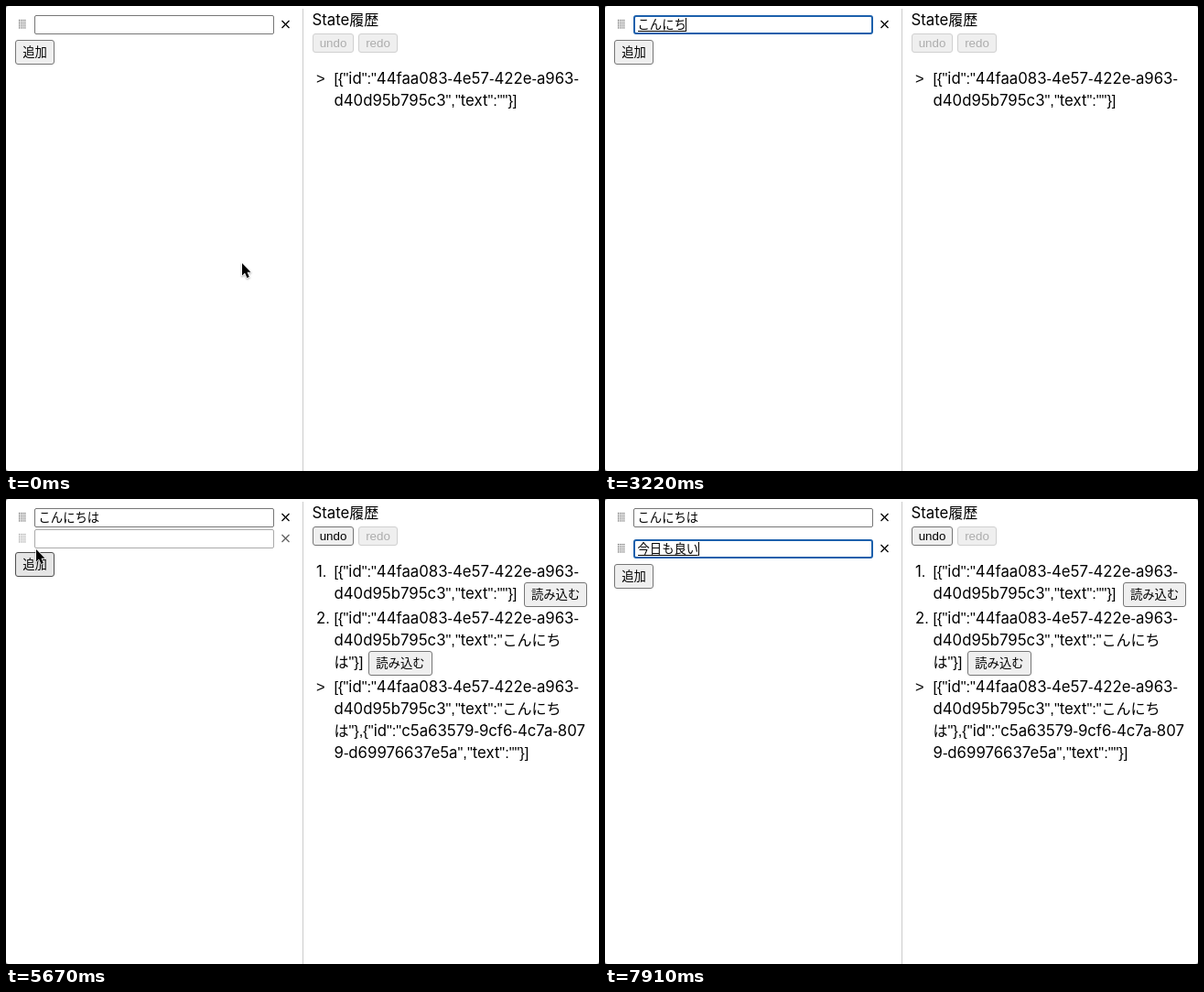
Animation, 648 px wide and 508 px high, one loop 8 s. Source, as an HTML page with a canvas:

```html
<!DOCTYPE html>
<html lang="ja">
<head>
<meta charset="utf-8">
<style>
html, body { margin: 0; width: 100%; height: 100%; overflow: hidden; background: #fff; }
canvas { display: block; width: 648px; height: 508px; }
</style>
</head>
<body>
<canvas id="stage"></canvas>
<script>
const W = 648, H = 508, LOOP = 8000, STEP = 70;
const CJK = '"Noto Sans CJK JP", "Noto Sans CJK", sans-serif';
const KANA = '16px ' + CJK;
const WORD = '16.75px Inter, sans-serif';
const PUNCT = '16.4px "Liberation Sans", Arial, sans-serif';
const FIELD = '13.333px ' + CJK;
const CONTROL = '13.333px "Liberation Sans", Arial, sans-serif';

const canvas = document.getElementById('stage');
const ctx = canvas.getContext('2d');
const dpr = window.devicePixelRatio || 1;
canvas.width = W * dpr;
canvas.height = H * dpr;

// Text entry as [time, text]
const firstText = [
  [0, ''], [2380, 'ｋ'], [2520, 'こ'], [2660, 'こｎ'], [2800, 'こん'], [2940, 'こんに'],
  [3080, 'こんにｃ'], [3220, 'こんにち'], [3290, 'こんにちｈ'], [3430, 'こんにちは']
];
const secondText = [
  [0, ''], [6930, 'ｋ'], [7070, 'ｋｙ'], [7140, 'きょ'], [7280, 'きょう'], [7420, '今日'],
  [7560, '今日ｍ'], [7630, '今日も'], [7770, '今日もい'], [7910, '今日も良い']
];
const caretOn = [[1680, 2240], [2380, 4340], [4830, 5320], [5880, 6370], [6860, LOOP]];

// Pointer path as [time, x, y]; it hides while typing
const pointerPath = [
  [0, 258, 281], [420, 608, 170], [560, 600, 120], [980, 20, 25], [1120, 72, 29],
  [1400, 93, 24], [1680, 93, 23], [1750, 93, 21], [4410, 93, 21], [4620, 102, 48],
  [5180, 33, 55], [5670, 33, 55], [5950, 80, 54], [6440, 82, 52]
];
const pointerOn = [[0, 2380], [4410, 6440]];

const ID_HEAD = '[{"id":"44faa083-4e57-422e-a963-';
const ID_TAIL = 'd40d95b795c3","text":"';
const history = [
  { from: 0, y: 85, load: [565.9, 91], lines: [ID_HEAD, ID_TAIL + '"}]'] },
  { from: 3780, y: 136, load: [396.3, 166], lines: [ID_HEAD, ID_TAIL + 'こんにち', 'は"}]'] },
  { from: 5530, y: 211, lines: [ID_HEAD, ID_TAIL + 'こんにち',
    'は"},{"id":"c5a63579-9cf6-4c7a-807', '9-d69976637e5a","text":""}]'] }
];

const within = (spans, t) => spans.some(([a, b]) => t >= a && t < b);
const latest = (list, t) => list.filter(e => e[0] <= t).pop()[1];
const easeOut = k => 1 - (1 - k) ** 2;
const clamp = k => Math.max(0, Math.min(1, k));

function pointerAt(t) {
  const i = pointerPath.findIndex(p => p[0] > t);
  if (i < 0) return pointerPath[pointerPath.length - 1].slice(1);
  const [t0, x0, y0] = pointerPath[i - 1], [t1, x1, y1] = pointerPath[i];
  const k = (t - t0) / (t1 - t0);
  return [x0 + (x1 - x0) * k, y0 + (y1 - y0) * k];
}

function label(text, x, y, font, color = '#000', align = 'left') {
  ctx.font = font;
  ctx.fillStyle = color;
  ctx.textAlign = align;
  ctx.fillText(text, x, y);
}

// Body text: words, kana and punctuation each have their own face
function prose(text, x, y) {
  for (const run of text.match(/\w+|[^\x00-\x7f]+|\W/g)) {
    label(run, x, y, /\w/.test(run) ? WORD : run > '\x7f' ? KANA : PUNCT);
    x += ctx.measureText(run).width;
  }
}

// Edges snap to whole pixels
function box(x, y, w, h, fill, border, line = 1, radius = 2.5) {
  const left = Math.round(x), top = Math.round(y);
  const right = Math.round(x + w), bottom = Math.round(y + h);
  ctx.beginPath();
  ctx.roundRect(left + line / 2, top + line / 2, right - left - line, bottom - top - line, radius);
  ctx.fillStyle = fill;
  ctx.fill();
  ctx.lineWidth = line;
  ctx.strokeStyle = border;
  ctx.stroke();
}

function button(text, x, y, w, h, font, { fill = '#efefef', border = '#767676', ink = '#000' } = {}) {
  box(x, y, w, h, fill, border);
  label(text, x + w / 2, y + h / 2 + (h > 21 ? 4.5 : 4.5), font, ink, 'center');
}

function item(y, text, { focus, caret, composing, alpha = 1 }) {
  ctx.globalAlpha = alpha;
  ctx.fillStyle = '#444';
  for (let i = 0; i < 20; i++) {
    ctx.fillRect(14 + (i % 4) * 2.1, y + 5 + Math.floor(i / 4) * 2.1, 1.1, 1.1);
  }
  if (focus) box(31, y, 262, 21, '#fff', '#1c60ac', 2, 2);
  else box(31, y, 262, 21, '#fff', '#767676', 1, 1.5);
  label(text, 35.5, y + 15, FIELD);
  const end = 35.5 + ctx.measureText(text).width;
  if (composing && text) ctx.fillRect(36, y + 17, end - 36.5, 1);
  if (caret) ctx.fillRect(Math.round(end - 0.5), y + 3, 1, 15);

  ctx.beginPath();
  ctx.moveTo(301.5, y + 6); ctx.lineTo(309.5, y + 14);
  ctx.moveTo(309.5, y + 6); ctx.lineTo(301.5, y + 14);
  ctx.lineWidth = 1.3;
  ctx.strokeStyle = '#000';
  ctx.stroke();
  ctx.globalAlpha = 1;
}

function arrow(x, y) {
  const shape = [[0, 0], [0, 13.4], [3, 10.6], [5.4, 16], [7.8, 15], [5.5, 9.7], [9.5, 9.7]];
  ctx.beginPath();
  shape.forEach(([dx, dy]) => ctx.lineTo(x + dx, y + dy));
  ctx.closePath();
  ctx.save();
  ctx.shadowColor = 'rgba(0,0,0,.35)';
  ctx.shadowBlur = 2;
  ctx.shadowOffsetY = 1;
  ctx.lineWidth = 1.6;
  ctx.lineJoin = 'round';
  ctx.strokeStyle = '#fff';
  ctx.stroke();
  ctx.restore();
  ctx.fillStyle = '#000';
  ctx.fill();
}

function beam(x, y) {
  ctx.beginPath();
  ctx.moveTo(x - 3, y - 7); ctx.quadraticCurveTo(x + 0.5, y - 7, x + 0.5, y - 5);
  ctx.lineTo(x + 0.5, y + 5); ctx.quadraticCurveTo(x + 0.5, y + 7, x - 3, y + 7);
  ctx.moveTo(x + 4, y - 7); ctx.quadraticCurveTo(x + 0.5, y - 7, x + 0.5, y - 5);
  ctx.moveTo(x + 0.5, y + 5); ctx.quadraticCurveTo(x + 0.5, y + 7, x + 4, y + 7);
  ctx.moveTo(x - 1.5, y + 3.5); ctx.lineTo(x + 2.5, y + 3.5);
  ctx.lineWidth = 1.1;
  ctx.strokeStyle = '#000';
  ctx.stroke();
}

function drawHistory(t) {
  const off = { border: '#d0d0d0', ink: '#adadad' };
  prose('State履歴', 334.5, 21);
  button('undo', 335, 30, 45, 21, CONTROL, t < 3780 ? off : {});
  button('redo', 385, 30, 43, 21, CONTROL, off);
  const shown = history.filter(h => h.from <= t);
  shown.forEach((h, i) => {
    const current = i === shown.length - 1;
    prose(current ? '>' : i + 1 + '.', 339, h.y);
    h.lines.forEach((line, n) => prose(line, 358.5, h.y + n * 24));
    if (!current) button('読み込む', ...h.load, 69.3, 27, FIELD);
  });
}

function addStyle(t) {
  if (within([[5460, 5530]], t)) return { fill: '#f5f5f5', border: '#8d8d8d' };
  if (within([[5110, 5740]], t)) return { fill: '#e5e5e5', border: '#4f4f4f' };
  return {};
}

function drawList(t) {
  const caret = within(caretOn, t);
  const grow = easeOut(clamp((t - 5530) / 365));
  const secondY = Math.round(15 + 29 * grow);
  const focusFirst = t >= 1680 && t < 5460;
  const focusSecond = t >= 5880;
  if (grow > 0) {
    item(secondY, latest(secondText, t), {
      focus: focusSecond, caret: focusSecond && caret, composing: true, alpha: grow
    });
  }
  item(10, latest(firstText, t), {
    focus: focusFirst, caret: focusFirst && caret, composing: t < 3710
  });
  button('追加', 10, Math.round(37 + 34 * grow), 43, 27, FIELD, addStyle(t));

  if (!within(pointerOn, t)) return;
  const [x, y] = pointerAt(t);
  const over = top => x >= 31 && x <= 293 && y >= top && y <= top + 21;
  (over(10) || (grow > 0.7 && over(secondY)) ? beam : arrow)(x, y);
}

function draw(t) {
  ctx.setTransform(dpr, 0, 0, dpr, 0, 0);
  ctx.fillStyle = '#8a8a8a';
  ctx.fillRect(0, 0, W, H);
  ctx.fillStyle = '#fff';
  ctx.beginPath();
  ctx.roundRect(0, 0, W, H, 3);
  ctx.fill();
  ctx.fillStyle = '#ccc';
  ctx.fillRect(324, 3, 1, H - 3);
  drawHistory(t);
  drawList(t);
}

const start = performance.now();
function tick() {
  const t = (performance.now() - start) % LOOP;
  draw(Math.floor(t / STEP) * STEP);
  requestAnimationFrame(tick);
}
tick();
</script>
</body>
</html>
```
